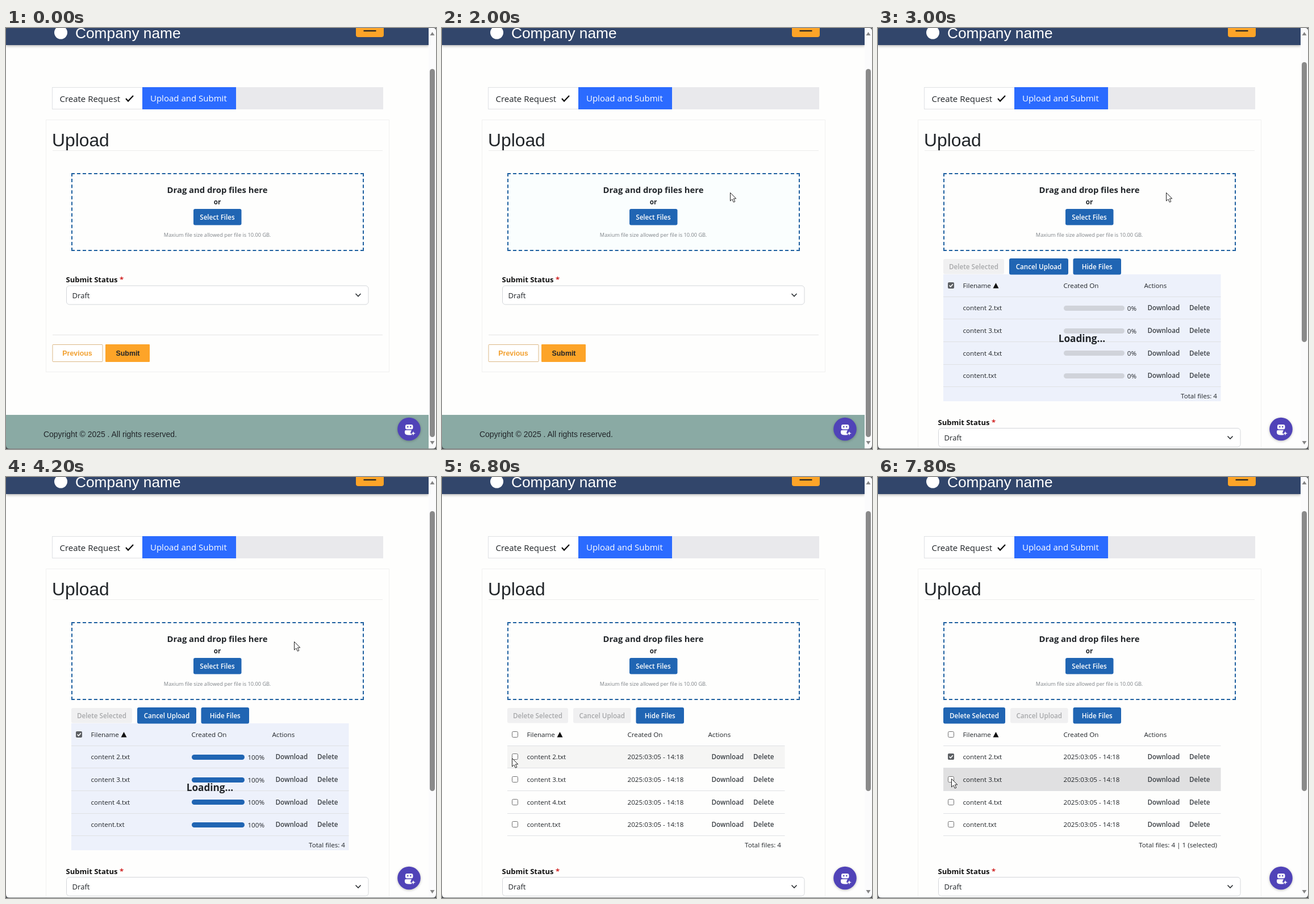
Animation, 757 px wide and 740 px high, one loop 8000 ms. Source, as an HTML page:

```html
<!DOCTYPE html>
<html lang="en">
<head>
<meta charset="utf-8">
<title>File upload</title>
<style>
  @property --done { syntax: "<integer>"; inherits: true; initial-value: 0; }

  html, body { margin: 0; width: 100%; height: 100%; overflow: hidden; background: #fefefd; }
  svg { position: absolute; left: 0; top: 0; }
  text { font: 11.65px "Open Sans", "Noto Sans", sans-serif; fill: #212529; white-space: pre; }
  .semi { font-weight: 600; }
  .bold { font-weight: 700; }
  .mid { text-anchor: middle; }
  .end { text-anchor: end; }
  .tab { font-size: 15px; }
  .arial { font-family: "Liberation Sans", Arial, sans-serif; }
  .action { font-weight: 600; fill: #3c4146; }
  .white { fill: #fff; }
  .line { stroke: #dfe1e4; }

  .zone {
    position: absolute; left: 115px; top: 255px; width: 515px; height: 137px;
    box-sizing: border-box; border: 2px dashed #1d5f9f;
  }
  .progress {
    display: flex; align-items: center; gap: 5px; width: 128px; height: 18px;
    font: 11.65px "Open Sans", "Noto Sans", sans-serif; color: #212529;
  }
  .track { flex: 1; height: 9px; border-radius: 5px; background: #d0d3da; overflow: hidden; }
  .track i { display: block; height: 100%; width: calc(var(--done) * 1%); background: #2065b3; }
  .progress span { counter-reset: done var(--done); }
  .progress span::after { content: counter(done) "%"; }

  /* One 8 s clock; the picture advances every 200 ms (2.5%). */
  .zone, .start, .list, .load, .ready, .idle, .picked, .ghost, .cursor, .hover1, .hover2 {
    animation: 8s step-end infinite;
  }
  .zone { animation-name: zone; }
  .start { animation-name: start; }
  .list { animation-name: list; }
  .load { animation-name: load, fill; }
  .ready { animation-name: ready; }
  .idle { animation-name: idle; }
  .picked { animation-name: picked; }
  .ghost { animation-name: ghost; }
  .cursor { animation-name: move; }
  .hover1 { animation-name: hover1; }
  .hover2 { animation-name: hover2; }

  @keyframes zone { 0%, 27.5%, 100% { background: #fefefd } 10% { background: #fafefe } }
  @keyframes start { 0% { opacity: 1 } 27.5%, 100% { opacity: 0 } }
  @keyframes list { 0% { opacity: 0 } 27.5%, 100% { opacity: 1 } }
  @keyframes load { 0%, 62.5%, 100% { opacity: 0 } 27.5% { opacity: 1 } }
  @keyframes ready { 0% { opacity: 0 } 62.5%, 100% { opacity: 1 } }
  @keyframes idle { 0%, 90%, 100% { opacity: 0 } 62.5% { opacity: 1 } }
  @keyframes picked { 0% { opacity: 0 } 90%, 100% { opacity: 1 } }
  @keyframes ghost { 0%, 22.5%, 100% { opacity: 0 } 2.5% { opacity: 1 } }
  @keyframes hover1 { 0%, 95%, 100% { opacity: 0 } 85% { opacity: .3 } 87.5% { opacity: 1 } }
  @keyframes hover2 { 0% { opacity: 0 } 95% { opacity: .4 } 97.5%, 100% { opacity: 1 } }
  @keyframes fill {
    0% { --done: 0 }
    40% { --done: 0; animation-timing-function: steps(5) }
    52.5%, 100% { --done: 100 }
  }
  @keyframes move {
    0% { transform: translate(800px, 620px) }
    2.5% { transform: translate(738px, 552px); animation-timing-function: steps(4) }
    12.5% { transform: translate(566px, 357px); animation-timing-function: steps(3) }
    20%, 62.5% { transform: translate(507px, 289px) }
    65% { transform: translate(502.5px, 293.5px); animation-timing-function: steps(2) }
    70% { transform: translate(430px, 333px); animation-timing-function: steps(3) }
    77.5% { transform: translate(230px, 438px); animation-timing-function: steps(3) }
    85% { transform: translate(123px, 494px) }
    90% { transform: translate(123px, 494px); animation-timing-function: steps(3) }
    97.5%, 100% { transform: translate(129px, 530px) }
  }
</style>
</head>
<body>
<div class="zone"></div>
<svg width="757" height="740" viewBox="0 0 757 740">
  <defs>
    <rect id="box" x="123.5" y="-5.5" width="10" height="10" rx="2" fill="#fff" stroke="#6f6f6f"/>
    <g id="checked">
      <rect x="123" y="-6" width="11" height="11" rx="2" fill="#5c5f63"/>
      <path d="M125.5-.5l2.3 2.3 4-4.6" fill="none" stroke="#fff" stroke-width="1.6"/>
    </g>
    <g id="status">
      <text class="bold" x="105.5" y="447" style="font-size:13px;fill:#111">Submit Status <tspan fill="#d01f1f">*</tspan></text>
      <rect x="106.5" y="453" width="531.5" height="33" rx="5" fill="#fff" stroke="#d3d6d9"/>
      <text x="116.5" y="474.5" style="font-size:13.1px">Draft</text>
      <path d="M615.5 467l4.5 4.5 4.5-4.5" fill="none" stroke="#2b2f33" stroke-width="1.6"/>
    </g>
  </defs>

  <!-- header -->
  <rect width="744" height="30" fill="#32466b" style="filter:drop-shadow(0 2px 2px #0004)"/>
  <circle cx="96.5" cy="8" r="11.5" fill="#fff"/>
  <text class="arial white" x="122" y="18" style="font-size:26.3px">Company name</text>
  <rect x="616" y="-20" width="49" height="36" rx="4" fill="#fda428"/>
  <path d="M629.5 5h22" stroke="#222" stroke-width="2.2"/>

  <!-- steps -->
  <rect x="81" y="104" width="583" height="39" fill="#e9e9ec"/>
  <rect x="81.5" y="104.5" width="159" height="38" fill="#fff" stroke="#dfe1e4"/>
  <rect x="240" y="104" width="165" height="39" fill="#2b6bff"/>
  <text class="tab" x="94.5" y="129.5">Create Request</text>
  <path d="M211 124l4 4.5 9-9.5" fill="none" stroke="#111" stroke-width="2.2"/>
  <text class="tab white" x="254" y="128.5">Upload and Submit</text>

  <!-- upload card -->
  <text class="arial" x="81" y="208" style="font-size:31.8px">Upload</text>
  <path d="M82 215.5h581" stroke="#ececec"/>
  <text class="bold mid" x="372" y="289.5" style="font-size:14.8px">Drag and drop files here</text>
  <text class="bold mid" x="372" y="309.5">or</text>
  <rect x="330" y="318" width="84.5" height="28.5" rx="3" fill="#2065b3"/>
  <text class="semi mid white" x="372" y="336.5">Select Files</text>
  <text class="mid" x="372" y="367" style="font-size:9.2px;fill:#7d8287">Maxium file size allowed per file is 10.00 GB.</text>

  <g class="start">
    <rect x="70.5" y="161.5" width="604" height="443" fill="none" stroke="#f0f0f0"/>
    <use href="#status"/>
    <path d="M82 539.5h581" stroke="#e4e4e4"/>
    <rect x="82" y="556.5" width="88" height="30" rx="1" fill="#fff" stroke="#dcb887"/>
    <text class="arial bold mid" x="125.5" y="576" style="font-size:12.4px;fill:#f2a02f">Previous</text>
    <rect x="175" y="556" width="78" height="31" rx="1" fill="#fda428"/>
    <text class="arial bold mid" x="214.5" y="576" style="font-size:12.4px">Submit</text>
    <rect y="680" width="744" height="60" fill="#8aaaa4"/>
    <text class="arial" x="66" y="719" style="font-size:13.95px">Copyright © 2025 . All rights reserved.</text>
  </g>

  <g class="list">
    <path d="M70.5 740V161.5h604V740" fill="none" stroke="#f0f0f0"/>
    <use href="#status" y="250.5"/>
    <rect class="load" x="115" y="433" width="488.5" height="223" fill="#edf1fb"/>
    <rect class="hover1" x="115" y="473" width="488.5" height="39" fill="#e0e0e1"/>
    <rect class="hover2" x="115" y="512" width="488.5" height="39.5" fill="#e0e0e1"/>
    <text x="149.5" y="457">Filename</text>
    <path d="M202.5 457.5h10l-5-9.5z" fill="#111"/>
    <text x="326.5" y="457">Created On</text>
    <text x="468.5" y="457">Actions</text>
    <g id="rows"></g>
  </g>
  <g class="load" id="loading"></g>
  <g class="ready" id="finished"></g>
  <g class="idle" id="unselected"></g>
  <g class="picked" id="selected"></g>

  <!-- scrollbar -->
  <rect x="744" width="13" height="740" fill="#fbfbfc"/>
  <path d="M746.5 13h8l-4-6zM746.5 726h8l-4 6z" fill="#858585"/>
  <rect class="start" x="746" y="72" width="9" height="647" rx="4.5" fill="#8a8a8a"/>
  <rect class="list" x="746" y="60" width="9" height="492" rx="4.5" fill="#8a8a8a"/>

  <!-- assistant button -->
  <circle cx="709.5" cy="705" r="20.3" fill="#5043b8" style="filter:drop-shadow(0 1px 2px #0004)"/>
  <g fill="#fff">
    <rect x="703" y="697" width="13.5" height="8.5" rx="3"/>
    <path d="M702 709q0-2 2-2h10l-2 4 3 4q-13 2-13-4z"/>
    <path d="M717 708l1.3 3.2 3.2 1.3-3.2 1.3-1.3 3.2-1.3-3.2-3.2-1.3 3.2-1.3z" stroke="#5043b8" stroke-width=".7"/>
    <g fill="#5043b8"><circle cx="707.3" cy="701" r="1.3"/><circle cx="712.3" cy="701" r="1.3"/></g>
  </g>

  <!-- window edge -->
  <path d="M0 739.5h757" stroke="#808485"/>
  <path d="M0 733v7h7q-7 0-7-7zM757 733v7h-7q7 0 7-7zM0 5V0h5q-5 0-5 5zM757 5V0h-5q5 0 5 5z" fill="#4a4d50"/>

  <g class="cursor">
    <g class="ghost">
      <rect x="3.2" y="6.2" width="177" height="177.5" rx="5" fill="#fefefd" stroke="#333" stroke-width="1.5"/>
      <rect x="27" y="33.5" width="95" height="34.5" rx="2" fill="#f9f9fc" stroke="#e5e6ec"/>
      <path d="M34.5 50.5h19M44 41v19" stroke="#222" stroke-width="1.8"/>
      <text x="61" y="58" style="font-size:20.4px;fill:#123a9c">Copy</text>
      <rect x="84" y="83" width="19.5" height="28" fill="#0b74cc"/>
      <text class="semi mid white" x="93.7" y="105" style="font-size:20px">4</text>
    </g>
    <path d="M.5.5v14.5l3.4-3.1 2.4 5.3 2.5-1.1-2.4-5.2h4.4z" fill="#fff" stroke="#222"/>
  </g>
</svg>
<script>
  const put = (id, html) => document.getElementById(id).innerHTML = html;
  const files = ["content 2.txt", "content 3.txt", "content 4.txt", "content.txt"];
  const rowY = i => 492.4 + 39.6 * i;
  const eachRow = draw => files.map((name, i) => draw(rowY(i), name)).join("");
  const mark = (kind, y) => `<use href="#${kind}" y="${Math.round(y)}"/>`;
  const total = label => `<text class="end" x="597" y="651">${label}</text>`;
  const button = (x, width, label, enabled) => `
    <rect x="${x}" y="${enabled ? 405 : 406}" width="${width}" height="${enabled ? 28.5 : 26.5}" rx="3"
      fill="${enabled ? "#2065b3" : "#f0f0f1"}"/>
    <text class="semi mid" x="${x + width / 2}" y="423.5" style="fill:${enabled ? "#fff" : "#a7a8aa"}">${label}</text>`;

  put("rows", `<path class="line" d="M115 472.5h488.5"/>` + eachRow((y, name) => `
    <text x="149.5" y="${y + 4}">${name}</text>
    <text class="action" x="474.5" y="${y + 4}">Download</text>
    <text class="action" x="548" y="${y + 4}">Delete</text>
    <path class="line" d="M115 ${Math.round(y + 19) + 0.5}h488.5"/>`));

  put("loading",
    button(115, 107, "Delete Selected", false) +
    button(231, 104, "Cancel Upload", true) +
    button(343.5, 84.5, "Hide Files", true) +
    mark("checked", 453) +
    eachRow(y => `<foreignObject x="327" y="${y - 9}" width="128" height="18">
      <div xmlns="http://www.w3.org/1999/xhtml" class="progress"><div class="track"><i></i></div><span></span></div>
    </foreignObject>`) +
    total("Total files: 4") +
    `<text class="bold mid" x="359" y="552" style="font-size:17.2px">Loading...</text>`);

  put("finished", mark("box", 453) + eachRow(y =>
    `<text x="326.5" y="${y + 4}">2025:03:05 - 14:18</text>` + mark("box", y)));

  put("unselected",
    button(115, 107, "Delete Selected", false) +
    button(231, 101.5, "Cancel Upload", false) +
    button(341.5, 84.5, "Hide Files", true) +
    total("Total files: 4"));

  put("selected",
    button(115, 109, "Delete Selected", true) +
    button(233, 101.5, "Cancel Upload", false) +
    button(343.5, 84.5, "Hide Files", true) +
    mark("checked", rowY(0)) +
    total("Total files: 4 | 1 (selected)"));
</script>
</body>
</html>
```
